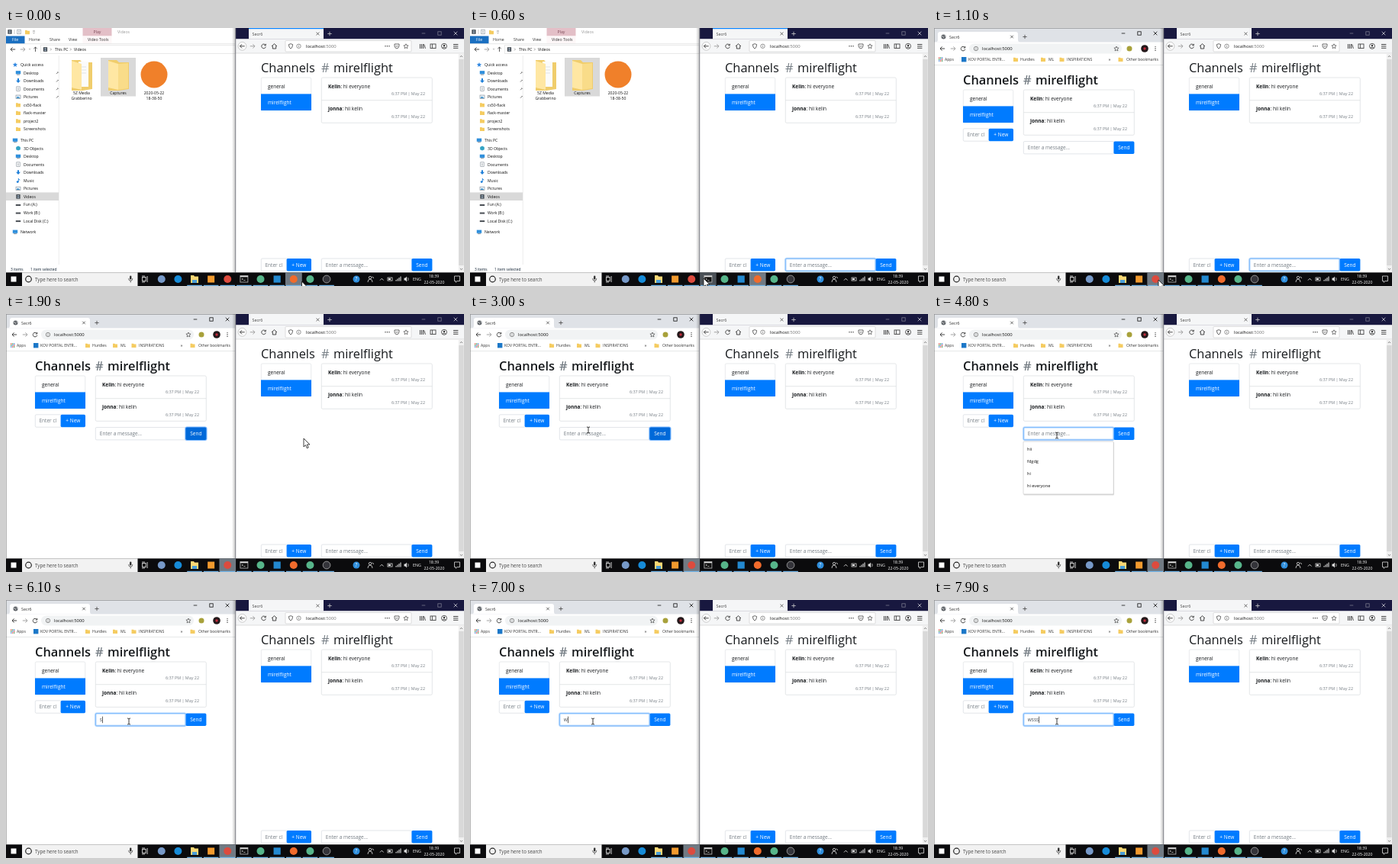
An HTML page for the animation above (8 s loop, 600x338 px).

```html
<!DOCTYPE html>
<html lang="en">
<head>
<meta charset="utf-8">
<title>Chat in two browsers</title>
<style>
html, body { margin: 0; width: 100%; height: 100%; overflow: hidden; background: #fff; }
svg { display: block; width: 100%; height: 100%; }
text { font-family: "Open Sans", "Noto Sans", sans-serif; white-space: pre; }
#explorer text { font-weight: 500; }
</style>
</head>
<body>
<svg id="stage" viewBox="0 0 600 338"></svg>
<script>
const LOOP = 8000;
const BLUE = '#007bff', INK = '#16191c', MUTED = '#757d84', EDGE = '#d9dcdf';

const rect = (x, y, w, h, fill, extra = '') =>
  `<rect x="${x}" y="${y}" width="${w}" height="${h}" fill="${fill}" ${extra}/>`;
const dot = (x, y, r, fill, extra = '') => `<circle cx="${x}" cy="${y}" r="${r}" fill="${fill}" ${extra}/>`;
const line = (d, color = '#333', width = .8) => `<path d="${d}" fill="none" stroke="${color}" stroke-width="${width}"/>`;
const shape = (d, fill, extra = '') => `<path d="${d}" fill="${fill}" ${extra}/>`;
const text = (x, y, size, str, fill = '#111', extra = '') =>
  `<text x="${x}" y="${y}" font-size="${size}" fill="${fill}" ${extra}>${str}</text>`;
const group = (id, content) => `<g id="${id}">${content}</g>`;
const stroke = (color, width = .8) => `stroke="${color}" stroke-width="${width}"`;
const END = 'text-anchor="end"', MID = 'text-anchor="middle"';

// Toolbar glyphs
const arrow = (x, y, dir, color = '#333') =>
  line(`M${x - 3.2 * dir} ${y}H${x + 3 * dir}m${-2.6 * dir} -2.6l${2.6 * dir} 2.6l${-2.6 * dir} 2.6`, color, .9);
const cross = (x, y, r, color) => line(`M${x - r} ${y - r}l${2 * r} ${2 * r}m0 ${-2 * r}l${-2 * r} ${2 * r}`, color);
const plus = (x, y, r, color) => line(`M${x - r} ${y}h${2 * r}M${x} ${y - r}v${2 * r}`, color);
const reload = (x, y) => line(`M${x + 2.3} ${y - 1.6}a2.8 2.8 0 1 0 .5 2.4M${x + 2.8} ${y - 3}v2h-2`, '#333', .9);
const star = (x, y) => line(`M${x} ${y - 3}l.9 2 2.2.2-1.7 1.5.5 2.2-1.9-1.1-1.9 1.1.5-2.2-1.7-1.5 2.2-.2z`, '#444', .7);
const info = (x, y) => dot(x, y, 2.7, 'none', stroke('#666', .7)) + line(`M${x} ${y - .4}v1.8m0-3.2v.6`, '#666', .7);
const winButtons = (x, y, color, closeColor) => line(`M${x - 2.3} ${y}h4.6`, color)
  + rect(x + 18.8, y - 2.2, 4.4, 4.4, 'none', stroke(color)) + cross(x + 42, y, 2.3, closeColor);

// Small icons, centred on x, y
const icons = {
  folder: (x, y) => shape(`M${x - 3} ${y - 2.5}h2.4l.8 .8h2.8v4.4h-6z`, '#f5cc61'),
  star: (x, y) => shape(`M${x} ${y - 3}l.9 2 2.2.2-1.7 1.5.5 2.2-1.9-1.1-1.9 1.1.5-2.2-1.7-1.5 2.2-.2z`, '#2f86e0'),
  screen: (x, y) => rect(x - 3.2, y - 2.4, 6.4, 4.2, '#2f8fdc') + line(`M${x - 2} ${y + 2.6}h4`, '#567', .7),
  down: (x, y) => shape(`M${x - 1} ${y - 3}h2v2.6h2l-3 3.2-3-3.2h2z`, '#1f7fd8'),
  page: (x, y) => rect(x - 2.2, y - 2.8, 4.4, 5.6, '#fff', stroke('#7d8791', .6)) + line(`M${x - 1} ${y - .8}h2m-2 1.6h2`, '#7d8791', .6),
  picture: (x, y) => rect(x - 3, y - 2.2, 6, 4.4, '#e8f2fa', stroke('#7d8791', .6)) + shape(`M${x - 2.6} ${y + 1.8}l2-2.4 3.2 2.4z`, '#3c8fc8'),
  cube: (x, y) => shape(`M${x} ${y - 3}l2.8 1.4v3.2l-2.8 1.4-2.8-1.4v-3.2z`, '#33a3c4'),
  note: (x, y) => dot(x - .8, y + 1.8, 1.4, '#1f7fd8') + line(`M${x + .3} ${y + 1.8}v-4.4q.4 1.6 2 2`, '#1f7fd8', .9),
  film: (x, y) => rect(x - 2.6, y - 2.8, 5.2, 5.6, '#3a4148') + rect(x - 1.3, y - 1.8, 2.6, 1.5, '#9ab') + rect(x - 1.3, y + .5, 2.6, 1.5, '#9ab'),
  drive: (x, y) => rect(x - 3.2, y - .4, 6.4, 2, '#4a4f55'),
};

const button = (x, y, w, label) => rect(x, y, w, 16.4, BLUE, 'rx="1.6"')
  + text(x + w / 2, y + 10.6, 6.5, label, '#fff', MID);
const field = (x, y, w) => rect(x, y, w, 16.4, '#fff', stroke('#ced4da', .6) + ' rx="1.6"');
const ring = (id, x, y, w, h = 16.4) => group(id,
  rect(x, y, w, h, 'none', 'stroke="#007bff" stroke-opacity=".25" stroke-width="2.6" rx="1.8"')
  + rect(x, y, w, h, 'none', stroke('#80bdff', .9) + ' rx="1.6"'));

function chatPage(x, y, weight, channelY, messageY) {
  const message = (top, name, body) =>
    text(x + 88, top + 13.6, 6.5, `<tspan font-weight="700">${name}</tspan>: ${body}`, INK)
    + text(x + 215, top + 23, 5.4, '6:37 PM | May 22', MUTED, END);
  const heading = (dx, str, fill) => text(x + dx, y + 58, 16.4, str, fill, `font-weight="${weight}"`);
  return heading(0, 'Channels', INK) + heading(79, '#', MUTED) + heading(95, 'mirelflight', INK)
    + rect(x + .3, y + 65, 65.4, 43, '#fff', stroke(EDGE, .6) + ' rx="1.6"')
    + rect(x, y + 86.4, 66, 21.6, BLUE)
    + text(x + 9, y + 79, 6.5, 'general', INK) + text(x + 9, y + 100.4, 6.5, 'mirelflight', '#fff')
    + rect(x + 79.3, y + 65, 145, 59.3, '#fff', stroke(EDGE, .7) + ' rx="1.6"')
    + line(`M${x + 79.3} ${y + 94.7}h145`, EDGE, .7)
    + message(y + 65, 'Kelin', 'hi everyone') + message(y + 94.5, 'jonna', 'hii kelin')
    + field(x + .3, channelY, 35) + text(x + 5.5, channelY + 10.6, 6.5, 'Enter cl', MUTED)
    + button(x + 33.6, channelY, 32.4, '+ New')
    + field(x + 79.3, messageY, 119) + button(x + 197.4, messageY, 27, 'Send');
}

function explorer() {
  const quick = [['Desktop', 'screen'], ['Downloads', 'down'], ['Documents', 'page'], ['Pictures', 'picture'],
    ['cs50-flack', 'folder'], ['flack-master', 'folder'], ['project2', 'folder'], ['Screenshots', 'folder']];
  const computer = [['3D Objects', 'cube'], ['Desktop', 'screen'], ['Documents', 'page'], ['Downloads', 'down'], ['Music', 'note'],
    ['Pictures', 'picture'], ['Videos', 'film'], ['Fun (A:)', 'drive'], ['Work (B:)', 'drive'], ['Local Disk (C:)', 'drive']];
  const row = (x, y, label, icon) => icons[icon](x, y) + text(x + 7, y + 2, 5.1, label);
  const branch = (y, label, icon, items) => row(12, y, label, icon)
    + items.map(([name, kind], i) => row(16, y + 10.55 * (i + 1), name, kind)).join('');
  const folderBack = x => shape(`M${x} 42h11l3 3h13v35l-13 2H${x}z`, '#f0cd6c');
  const folderFlap = x => shape(`M${x} 43l13 4v34l-13-3z`, '#ffe7a3');
  const tabs = [['Home', 30], ['Share', 57], ['View', 82], ['Video Tools', 107]];
  const labels = [['5Z Media', 99, 87.2], ['Grabberino', 99, 93.6], ['Captures', 147, 87.2],
    ['2020-05-22', 194, 87.2], ['18-38-50', 194, 93.6]];
  return rect(0, 0, 300, 321, '#fff')
    + icons.film(5, 5) + line('M11 2v6', '#aaa', .6) + icons.page(17, 5)
    + icons.folder(28, 5.5) + line('M35 4h3M35.4 6l1.1 1 1.1-1', '#555', .6)
    + rect(100.5, 0, 38, 10.5, '#e3bfc7') + text(119.5, 7, 5.2, 'Play', '#7d4b58', MID) + text(146, 7, 5.2, 'Videos', '#999')
    + rect(100.5, 10.5, 38, 10, '#fdf7f8') + rect(0, 10.5, 24.5, 10, '#1a6fc0') + text(12, 17.4, 5.2, 'File', '#fff', MID)
    + tabs.map(([s, x]) => text(x, 17.4, 5.2, s, '#333')).join('')
    + line('M0 20.7H300', '#dadbdc', .7)
    + arrow(9, 28, -1) + arrow(22, 28, 1, '#999') + line('M30 27l1.2 1.2 1.2-1.2', '#777', .6)
    + line('M38.5 31v-6m-2.2 2.2l2.2-2.2 2.2 2.2')
    + rect(45.5, 22.8, 255, 10.8, '#fff', stroke('#d9d9d9', .6)) + icons.film(51.5, 28)
    + line('M58 26.5l1.5 1.5-1.5 1.5M84 26.5l1.5 1.5-1.5 1.5', '#666', .6)
    + text(64, 30, 5.2, 'This PC') + text(89, 30, 5.2, 'Videos')
    + rect(0, 215.4, 69, 10.6, '#d9d9d9') + line('M69.3 36V310', '#e4e4e4', .7)
    + branch(48, 'Quick access', 'star', quick) + branch(147, 'This PC', 'screen', computer) + row(12, 267, 'Network', 'screen')
    + [58.6, 69.1, 79.7, 90.2].map(y => line(`M66 ${y + 1.5}l2.2-2.2m-.6-.6l1.200 1.200`.replaceAll('00', ''), '#777', 1)).join('')
    + rect(124, 39, 46, 50.5, '#d9d9d9')
    + folderBack(86) + rect(95, 44, 13, 33, '#fbfbfb') + line('M98 51h7m-7 4h7m-7 4h7', '#d5d8da', .7) + folderFlap(86)
    + folderBack(134) + folderFlap(134) + shape('M147 47l13 -1v33l-13 2z', '#f9dc89')
    + dot(194, 61, 17.5, '#f0802a')
    + labels.map(([s, x, y]) => text(x, y, 5.1, s, '#111', MID)).join('')
    + text(6, 318, 4.9, '3 items', '#123') + text(32, 318, 4.9, '1 item selected', '#123');
}

function chrome() {
  const marks = [['Apps', 14], ['KOV PORTAL ENTR...', 45], ['Hurdles', 113], ['ML', 150], ['INSPIRATIONS', 174], ['Other bookmarks', 252]];
  const grid = [0, 1, 2].flatMap(i => [0, 1, 2].map(j =>
    rect(6 + i * 2, 38.4 + j * 2, 1.4, 1.4, ['#e25043', '#43a05c', '#4a82e0'][(i + j) % 3])));
  return rect(0, 0, 300, 321, '#fff') + rect(0, 0, 300, 18.5, '#dfe2e7')
    + shape('M2 18.5q3 0 3-3V8q0-3 3-3h99q3 0 3 3v7.5q0 3 3 3z', '#fff')
    + dot(12.5, 11.5, 3, '#5f6368') + line('M10 11h2l1 2m1-3.5l1 2', '#fff', .6)
    + text(20, 13.6, 5.3, 'Secr6', '#333') + cross(102, 11.5, 1.8, '#444') + plus(119, 11.5, 2.6, '#444')
    + winButtons(248, 7, '#111', '#111')
    + arrow(11, 27, -1) + arrow(25, 27, 1, '#999') + reload(38, 27)
    + rect(46, 20.5, 200, 13, '#f1f3f4', 'rx="6.5"') + info(55, 27) + text(63, 29.1, 5.9, 'localhost:5000') + star(239, 27)
    + dot(256, 27, 3.5, '#a8a13b') + dot(276, 27, 4.8, '#24191b') + dot(276, 27, 1.7, '#c22b3b')
    + [24.6, 27, 29.4].map(y => dot(290, y, .7, '#333')).join('')
    + grid.join('') + rect(36, 38, 6.4, 6.4, '#1c78c8') + [107, 143, 167.5, 244.5].map(x => icons.folder(x, 41.3)).join('')
    + marks.map(([s, x]) => text(x, 43.2, 5.1, s, '#333')).join('') + text(228.5, 43.2, 6, '»', '#333')
    + line('M0 48.5H300', '#dcdee0', .7)
    + chatPage(38, 16, 600, 131.8, 148.5)
    + group('sendFocus', rect(235.4, 148.5, 27, 16.4, '#0069d9', stroke('#7fbaff', 2.2) + ' rx="1.6" paint-order="stroke"')
        + text(248.9, 159.1, 6.5, 'Send', '#fff', MID))
    + ring('messageFocus', 117.3, 148.5, 118)
    + text(122.8, 159.1, 6.5, 'Enter a message...', MUTED, 'id="placeholder"')
    + text(122.8, 159.1, 6.5, '', '#495057', 'id="typed"') + rect(0, 152.6, .7, 8.6, '#222', 'id="caret"')
    + group('suggestions', rect(117.4, 168, 118.6, 69.4, '#000', 'opacity=".14" rx="1"')
        + rect(117, 167, 118.2, 69, '#fff', stroke('#c4c4c4', .6) + ' rx="1"')
        + ['hii', 'fdgdg', 'hi', 'hi everyone'].map((s, i) => text(122, 179 + i * 15.9, 5.6, s)).join(''))
    + line('M.3 320V.3H300', '#666', .6);
}

function firefox() {
  return rect(301, 0, 299, 321, '#fff') + rect(301, 0, 299, 14.5, '#18183f') + rect(318, 0, 98, 14.5, '#f5f6f7')
    + rect(318, 0, 98, 1.2, '#0a84ff', 'id="activeTab"')
    + text(322.5, 9.6, 5.4, 'Secr6', '#444') + cross(408.5, 7.5, 1.9, '#444') + plus(424, 7.5, 2.7, '#ccc')
    + winButtons(547, 7, '#77778c', '#c8c8d2')
    + rect(301, 14.5, 299, 18.5, '#f5f6f7') + line('M301 33H600', '#ccc', .6)
    + dot(309.5, 23.8, 5.4, '#fff', stroke('#aaa', .6)) + arrow(309.5, 23.8, -1)
    + arrow(323, 23.8, 1, '#999') + reload(337.5, 23.8) + line('M348 24l3.5-3.3 3.5 3.3M349.3 23.4v3.6h4.4v-3.6', '#333', .9)
    + rect(366, 16.5, 165, 14.5, '#fff', stroke('#ccc', .6) + ' rx="1"')
    + line('M373 20.7l2.6.9q0 4-2.6 5.6q-2.6-1.6-2.6-5.6z', '#444')
    + info(383.5, 23.8) + text(393, 26, 5.9, 'localhost<tspan fill="#777">:5000</tspan>')
    + [497, 499.5, 502].map(x => dot(x, 23.8, .7, '#333')).join('')
    + line('M509 21h6v2.5q-.5 3-3 3.5q-2.5-.5-3-3.5zM510.5 23l1.5 1.5 1.5-1.5', '#444') + star(524, 23.8)
    + line('M542.5 21v6m2-6v6m2-6v6m1.2-5.7l1.6 5.6', '#333', .9)
    + rect(556, 21, 7, 5.6, 'none', stroke('#333')) + line('M558.6 21v5.6')
    + dot(574, 23.8, 3.5, 'none', stroke('#333')) + dot(574, 23, 1.2, '#333') + line('M572 26q2-2 4 0')
    + line('M586 21.5h6.4m-6.4 2.4h6.4m-6.4 2.4h6.4', '#333', .9)
    + rect(592.8, 33.3, 7.2, 287, '#f0f0f0') + rect(593.2, 41, 6.4, 270, '#d9d9d9')
    + line('M594.9 38l1.6-1.6 1.6 1.6M594.9 315l1.6 1.6 1.6-1.6', '#666')
    + chatPage(334, 0, 400, 302, 302) + text(418.8, 312.6, 6.5, 'Enter a message...', MUTED)
    + ring('firefoxFocus', 413.3, 302, 118);
}

const windowEdge = `<linearGradient id="shade"><stop stop-opacity="0"/><stop offset="1" stop-opacity=".22"/></linearGradient>`
  + rect(296, 0, 4.2, 320.3, 'url(#shade)') + rect(300.2, 0, 1, 320.3, '#77787f');

// Taskbar slots from the task view button onwards
const SLOT = 21.63, FIRST = 171.3, CHROME = 5, FIREFOX = 9;
const slotX = i => FIRST + i * SLOT;

function taskbar() {
  const icon = (i, draw) => draw(slotX(i) + SLOT / 2);
  const logo = (i, color) => icon(i, x => dot(x, 329, 5, color));
  const light = '#ddd';
  return rect(0, 320.3, 600, 18, '#0b0b0d') + rect(6.5, 325.5, 7, 7, '#fff')
    + rect(21, 320.3, 151.5, 17.7, '#f2f2f2') + dot(29.5, 329, 3.8, 'none', stroke('#222', 1.2))
    + text(38, 331.5, 6.2, 'Type here to search', '#444')
    + rect(162, 324.5, 2.4, 5, '#333', 'rx="1.2"') + line('M160.6 328q0 3.200 2.600 3.200t2.600-3.200M163.200 331v2.500'.replaceAll('00', ''), '#333', .7)
    + rect(0, 320.3, SLOT, 17.7, '#4b5157', 'id="hoverSlot"') + rect(0, 320.3, SLOT, 17.7, '#717a83', 'id="activeSlot"')
    + [3, 4, 5, 6, 7, 8, 9, 10, 11].map(i => rect(slotX(i) + 1, 336.8, SLOT - 2, 1.2, '#76b9ed')).join('')
    + icon(0, x => rect(x - 3.5, 326.5, 4.5, 5, 'none', stroke(light, .9)) + line(`M${x + 3} 325v8m-7-8h4m-4 8h4`, light, .9))
    + logo(1, '#7799c8') + logo(2, '#168bd8')
    + icon(3, x => shape(`M${x - 5} 324h4l1 1.5h5v8.5h-10z`, '#f8d775') + rect(x - 3, 330, 6, 4, '#4a9ed8'))
    + icon(4, x => rect(x - 4.5, 324.5, 9, 9, '#f29a2e'))
    + logo(5, '#dd4b3e')
    + icon(6, x => rect(x - 5, 324.5, 10, 8.5, '#111', stroke('#bbb')) + line(`M${x - 5} 325.5h10`, light, 1.5)
        + line(`M${x - 3} 328l1.5 1-1.5 1m2.5 .5h2`, light, .7))
    + logo(7, '#57b58a') + icon(8, x => rect(x - 4.6, 324.4, 9.2, 9.2, '#2389d0'))
    + logo(9, '#f06b2c') + logo(10, '#57b58a') + icon(11, x => dot(x, 329, 4.9, '#34343a', stroke('#aaa')))
    + dot(459, 329, 4.5, '#2f8edc') + text(459, 331.4, 6.5, '?', '#fff', MID)
    + dot(477, 327, 1.7, 'none', stroke(light)) + line('M474 333q0-4 3-4t3 4m-.5-7q2 0 2 2', light)
    + line('M490 330.5l2.3-2.3 2.3 2.3', light, .9)
    + rect(500, 327, 6, 4, 'none', stroke(light)) + rect(501, 328, 3, 2, light)
    + line('M511 331.5v-1.5m2 1.5v-3m2 3v-4.5m2 4.5v-6', light, 1.1)
    + shape('M521.5 327.5h1.6l2-2v7l-2-2h-1.6z', light) + line('M526.5 327q1.5 2 0 4', light, .7)
    + text(533, 331.2, 5.3, 'ENG', '#fff') + text(560.5, 326.8, 5.2, '18:39', '#fff', MID) + text(561, 335, 5.2, '22-05-2020', '#fff', MID)
    + line('M587.5 325h7v6.5h-3.5l-1.8 1.8v-1.8h-1.7z', light);
}

const stage = document.getElementById('stage');
stage.innerHTML = firefox() + group('explorer', explorer()) + group('chrome', chrome()) + windowEdge + taskbar()
  + group('pointer', shape('M0 0v11l2.5-2.3 1.8 4.1 1.9-.8-1.8-4h3.5z', '#fff', stroke('#111')))
  + group('beam', line('M-2-4q2 0 2 1q0-1 2-1M-2 4q2 0 2-1q0 1 2 1M0-3V3', '#222', .9));
const part = Object.fromEntries([...stage.querySelectorAll('[id]')].map(el => [el.id, el]));

const path = [[0, 387.5, 332], [100, 387.5, 332], [600, 306, 328], [950, 294, 330], [1200, 294, 330], [1900, 390, 163],
  [2050, 390, 163], [2200, 377, 124], [2450, 377, 124], [2900, 155, 152], [3050, 155, 152], [3300, 161, 159], [LOOP, 161, 159]];
const typing = [[0, ''], [5900, 's'], [6800, ''], [7000, 'w'], [7300, 'ws'], [7600, 'wss'], [7800, 'wsss']];

const ramp = (t, start, length = 150) => Math.min(1, Math.max(0, (t - start) / length));
const show = (name, on) => part[name].setAttribute('opacity', Number(on));

function pointerAt(t) {
  const i = path.findIndex(p => p[0] > t);
  const [t0, x0, y0] = path[i - 1], [t1, x1, y1] = path[i];
  const k = (t - t0) / (t1 - t0), ease = k * k * (3 - 2 * k);
  return [x0 + (x1 - x0) * ease, y0 + (y1 - y0) * ease];
}

function draw(t) {
  const chromeUp = t >= 1000;
  show('explorer', !chromeUp);
  show('chrome', chromeUp);
  show('activeTab', !chromeUp);
  show('firefoxFocus', ramp(t, 150) - ramp(t, 1150));
  show('sendFocus', ramp(t, 1150) - ramp(t, 3150));
  show('messageFocus', ramp(t, 3150));
  show('suggestions', t >= 3250 && t < 5900);

  const typed = typing.findLast(([start]) => start <= t)[1];
  part.typed.textContent = typed;
  show('placeholder', !typed);
  show('caret', t >= 5900 || (t >= 3300 && Math.floor((t - 3300) / 500) % 2 === 0));
  part.caret.setAttribute('x', 123 + (typed ? part.typed.getComputedTextLength() : 0));

  const [x, y] = pointerAt(t), overText = t > 2850;
  part.activeSlot.setAttribute('x', slotX(chromeUp ? CHROME : FIREFOX));
  part.hoverSlot.setAttribute('x', slotX(Math.floor((x - FIRST) / SLOT)));
  show('hoverSlot', y > 320);
  show('pointer', !overText);
  show('beam', overText);
  for (const name of ['pointer', 'beam']) part[name].setAttribute('transform', `translate(${x} ${y})`);
}

function tick() {
  draw(performance.now() % LOOP);
  requestAnimationFrame(tick);
}
tick();
</script>
</body>
</html>
```
